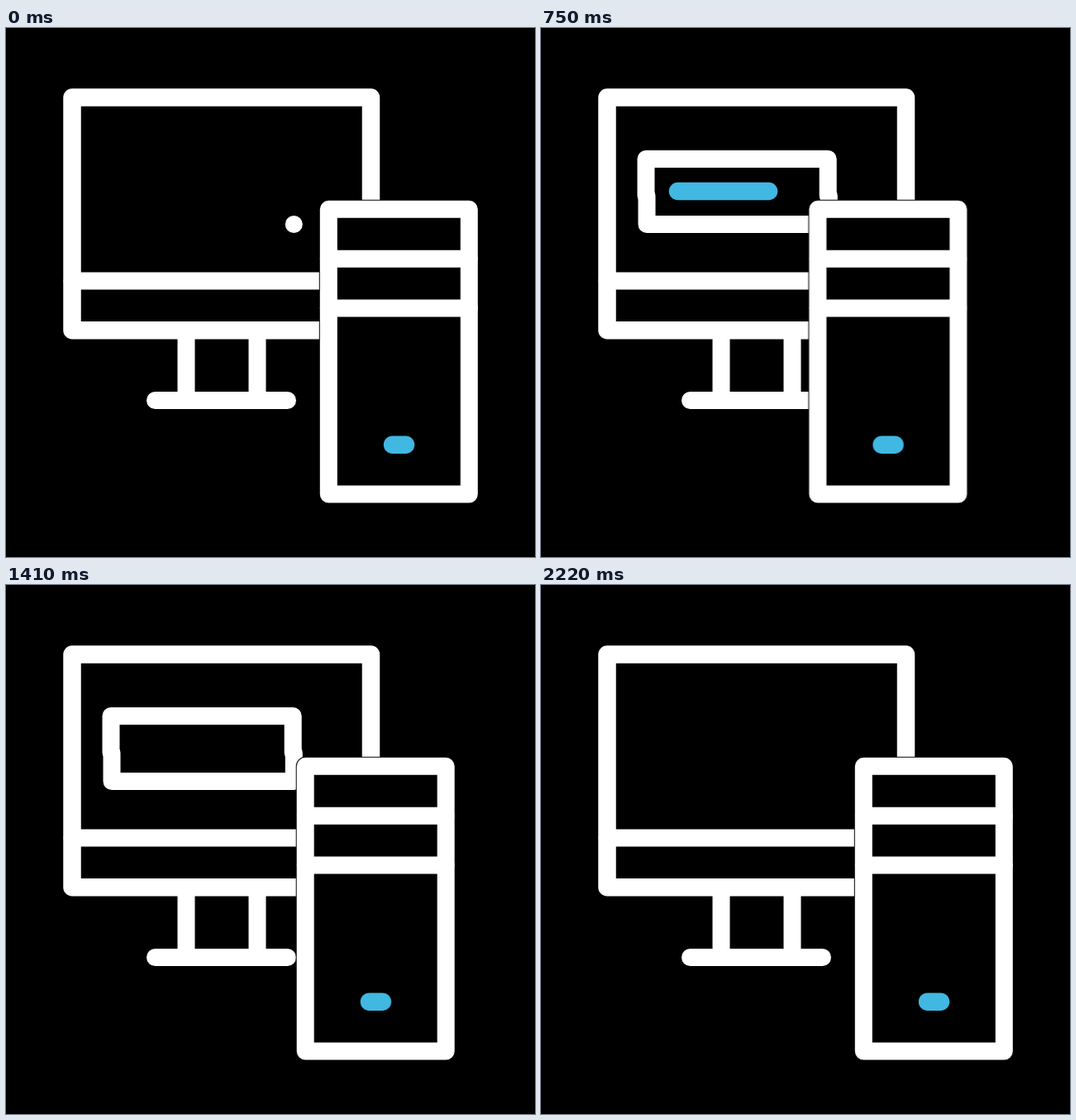
Animation of 640x640 px, one loop 2.25 s. Source, as an HTML page without scripts:

```html
<!DOCTYPE html>
<html lang="en">
<head>
<meta charset="utf-8">
<title>Desktop computer</title>
<style>
  html, body { margin: 0; height: 100%; overflow: hidden; background: #000; }
  svg { display: block; width: 100vw; height: 100vh; }

  .line { fill: none; stroke: #fff; stroke-width: 21; stroke-linecap: round; stroke-linejoin: round; }
  .accent { stroke: #40b8e2; stroke-width: 21.5; }
  .cover { fill: #000; stroke: #000; stroke-width: 23; stroke-linejoin: round; }

  .tower, .window, .bar, .light {
    animation: 2250ms cubic-bezier(.333, 0, .667, 1) infinite;
  }
  .tower { animation-name: slide; }
  .light { animation-name: blink; animation-timing-function: step-end; }
  .window {
    stroke-dasharray: 100 300;
    animation-name: trace, show-window;
    animation-timing-function: cubic-bezier(.333, 0, .667, 1), step-end;
  }
  .bar {
    animation-name: grow, shrink, show-bar;
    animation-timing-function: cubic-bezier(.333, 0, .667, 1), cubic-bezier(.333, 0, .667, 1), step-end;
  }

  @keyframes slide {
    0%, 13.2%, 75.78%, 100% { transform: translateX(0); }
    44% { transform: translateX(-76.5px); }
  }
  @keyframes blink {
    0%, 29.33%, 75.56% { stroke: #40b8e2; }
    20%, 64.44% { stroke: #fff; }
  }
  /* Drawn from the lower right corner, then erased in the same direction. */
  @keyframes trace {
    0% { stroke-dashoffset: 100; animation-timing-function: cubic-bezier(.556, 0, .625, 1); }
    31.33%, 66.18% { stroke-dashoffset: 0; }
    97.82%, 100% { stroke-dashoffset: -100; }
  }
  @keyframes show-window {
    0%, 97.82% { opacity: 0; }
    .3% { opacity: 1; }
  }
  @keyframes grow {
    0%, 9.42% { stroke-dasharray: 0 300; }
    43.33%, 100% { stroke-dasharray: 100 300; }
  }
  @keyframes shrink {
    0%, 37.78% { stroke-dashoffset: 0; }
    62.09%, 100% { stroke-dashoffset: -100; }
  }
  @keyframes show-bar {
    0%, 62.09% { opacity: 0; }
    9.5% { opacity: 1; }
  }
</style>
</head>
<body>
<svg viewBox="0 0 640 640">
  <g class="line">
    <rect x="80" y="84" width="361.5" height="281.7" stroke-width="21.5"/>
    <path d="M80 306H441M218 366V450M304 366V450M180.5 450.5H340.5"/>
  </g>
  <path class="line window" pathLength="100" d="M348.3 237.5H128V203H127V158.5H347.2V203H348.3V237.5"/>
  <path class="line accent bar" pathLength="100" d="M165.5 197.5H304.5"/>
  <g class="tower">
    <rect class="cover" x="390.3" y="219.3" width="170" height="344.8"/>
    <g class="line">
      <rect x="390.3" y="219.3" width="170" height="344.8"/>
      <path d="M390.3 279.3H560.3M390.3 339H560.3"/>
    </g>
    <path class="line accent light" d="M467.6 504.2H483.5"/>
  </g>
</svg>
</body>
</html>
```
